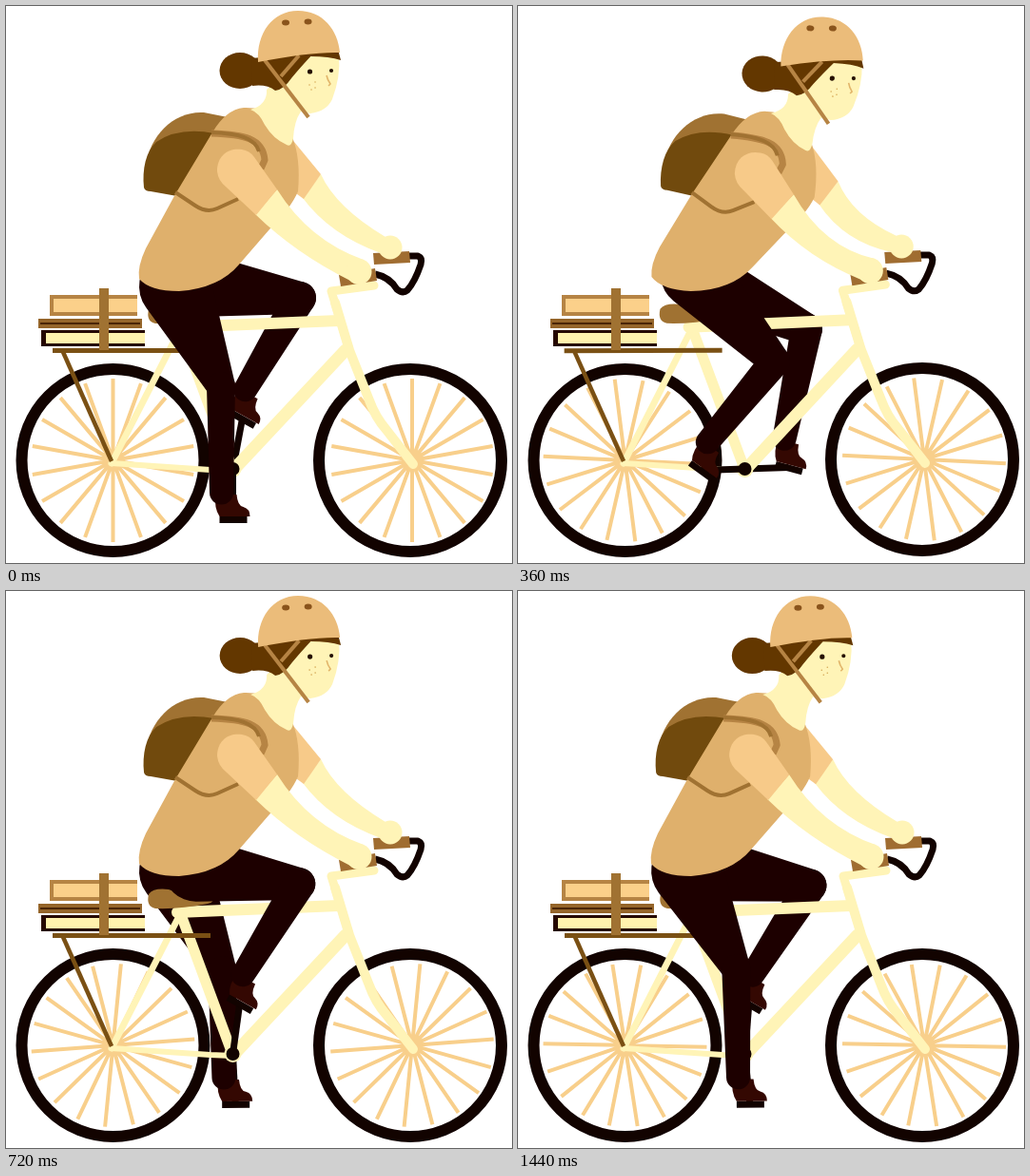
These frames come from a looping animation (532 px wide and 586 px high, 1500 ms). An HTML page with a canvas:

```html
<!DOCTYPE html>
<html lang="en">
<head>
<meta charset="utf-8">
<title>Cyclist</title>
<style>
  html, body { margin: 0; width: 100%; height: 100%; overflow: hidden; background: #fff; }
  canvas { display: block; }
</style>
</head>
<body>
<canvas id="stage" width="532" height="586"></canvas>
<script>
const ctx = document.getElementById('stage').getContext('2d');
const LOOP = 1500, STEP = 60, TAU = Math.PI * 2, RAD = Math.PI / 180;

const INK = '#120300', TROUSERS = '#1d0000', SHOE = '#340802';
const SKIN = '#fff4b7', SHIRT = '#dfb06c', SLEEVE = '#f7ca89', HELMET = '#ebbc7a';
const HAIR = '#633700', PACK = '#714a0d', BROWN = '#a07232', RACK = '#7a5014';
const SPOKE = '#f8cf8b', STRAP = '#b68444';

const CRANK = { x: 238.5, y: 487 };
const HIP = { x: 180, y: 295 };
const REAR_AXLE = { x: 112.5, y: 478 };
const FRONT_AXLE = { x: 425, y: 478 };

// One row per 60 degrees of crank: hip x, y, radius, knee x, y, radius, pedal tilt
const LEG_KEYS = [
  [178, 295, 38, 226, 400, 15, 0],
  [189, 286, 37, 255, 383, 16, 28],
  [182, 281, 34, 286, 359, 16, 40],
  [200, 293, 34, 309, 307, 17, 29],
  [190, 288, 34, 308, 329, 17, 21],
  [183, 283, 34, 290, 355, 16, 8]
];

function fillPath(d, color) {
  ctx.fillStyle = color;
  ctx.fill(new Path2D(d));
}

function strokePath(d, color, width, cap = 'butt') {
  ctx.strokeStyle = color;
  ctx.lineWidth = width;
  ctx.lineCap = cap;
  ctx.lineJoin = 'round';
  ctx.stroke(new Path2D(d));
}

function ellipse(x, y, rx, color, ry = rx) {
  ctx.fillStyle = color;
  ctx.beginPath();
  ctx.ellipse(x, y, rx, ry, 0, 0, TAU);
  ctx.fill();
}

function rect(x, y, w, h, color) {
  ctx.fillStyle = color;
  ctx.fillRect(x, y, w, h);
}

// Convex limb between two circles
function limb(a, ra, b, rb, color) {
  const dir = Math.atan2(b.y - a.y, b.x - a.x);
  const spread = Math.acos((ra - rb) / Math.hypot(b.x - a.x, b.y - a.y));
  ctx.fillStyle = color;
  ctx.beginPath();
  ctx.arc(a.x, a.y, ra, dir + spread, dir - spread);
  ctx.arc(b.x, b.y, rb, dir - spread, dir + spread);
  ctx.fill();
}

function rotate(p, angle, origin = { x: 0, y: 0 }) {
  const c = Math.cos(angle), s = Math.sin(angle);
  const x = p.x - origin.x, y = p.y - origin.y;
  return { x: origin.x + x * c - y * s, y: origin.y + x * s + y * c };
}

function withRotation(angle, origin, draw) {
  ctx.save();
  ctx.translate(origin.x, origin.y);
  ctx.rotate(angle);
  ctx.translate(-origin.x, -origin.y);
  draw();
  ctx.restore();
}

// Parabolic hop between two times, 0..1
function hop(t, start, end) {
  const u = (t - start) / (end - start);
  return u > 0 && u < 1 ? 4 * u * (1 - u) : 0;
}

// Smooth periodic interpolation through the leg poses
function legPose(phase) {
  const n = LEG_KEYS.length;
  const pos = (((phase / 60) % n) + n) % n;
  const i = Math.floor(pos), u = pos - i;
  const key = k => LEG_KEYS[(i + k + n) % n];
  return LEG_KEYS[0].map((_, j) => {
    const [a, b, c, d] = [key(-1)[j], key(0)[j], key(1)[j], key(2)[j]];
    return b + u / 2 * (c - a + u * (2 * a - 5 * b + 4 * c - d + u * (3 * (b - c) + d - a)));
  });
}

// The pedal reaches slightly forward over the top of its turn
function pedalAt(phase) {
  const s = Math.sin(phase * RAD), c = Math.cos(phase * RAD);
  return {
    x: CRANK.x - 46 * s + 10 * Math.max(0, -c) ** 4,
    y: CRANK.y + 53 * c
  };
}

function drawCrank(phase) {
  const p = pedalAt(phase);
  strokePath(`M${CRANK.x} ${CRANK.y}L${p.x} ${p.y}`, INK, 7);
}

function drawLeg(phase) {
  const [hx, hy, hr, kx, ky, kr, degrees] = legPose(phase);
  const pedal = pedalAt(phase), tilt = degrees * RAD;
  const knee = { x: kx, y: ky };
  const offset = rotate({ x: -12, y: -28 }, tilt);
  const ankle = { x: pedal.x + offset.x, y: pedal.y + offset.y };

  ctx.save();
  ctx.translate(pedal.x, pedal.y);
  ctx.rotate(tilt);
  rect(-14, -3, 29, 7, INK);
  fillPath('M-18 -26L4 -26Q5 -14 11 -13Q18 -11 18 -3L-14 -3Q-20 -12 -18 -26Z', SHOE);
  ctx.restore();

  limb({ x: hx, y: hy }, hr, knee, kr, TROUSERS);
  limb(knee, kr, ankle, 12.5, TROUSERS);
}

function drawWheel(x, y, turn, hubShift) {
  const hub = x + hubShift;
  ctx.strokeStyle = SPOKE;
  ctx.lineWidth = 4;
  ctx.lineCap = 'butt';
  ctx.beginPath();
  for (let a = 0; a < 360; a += 20) {
    const s = Math.sin((a + turn) * RAD), c = Math.cos((a + turn) * RAD);
    ctx.moveTo(hub + 6 * s, y - 6 * c);
    ctx.lineTo(hub + 86 * s, y - 86 * c);
  }
  ctx.stroke();
  ellipse(hub, y, 10.5, SPOKE);
  ctx.strokeStyle = INK;
  ctx.lineWidth = 12;
  ctx.beginPath();
  ctx.arc(x, y, 96, 0, TAU);
  ctx.stroke();
}

function drawFrame() {
  strokePath('M111 481L215 488L238 489', SKIN, 6, 'round');
  strokePath('M111 481L183 340', SKIN, 7, 'round');
  strokePath('M183 338L238 487', SKIN, 11, 'round');
  strokePath('M180 338L350 331', SKIN, 12, 'round');
  strokePath('M357 362L241 486', SKIN, 13, 'round');
  strokePath('M387 294L342 300L361 362', SKIN, 9, 'round');
  strokePath('M346 312L361 362L382 415Q388 432 400 446L428 482', SKIN, 10, 'round');
  fillPath('M150 319Q155 312 171 314Q190 322 217 323Q220 327 212 329Q183 335 157 334Q147 332 150 319Z', BROWN);
  strokePath('M60 364L111 479', RACK, 4.5);
  rect(49, 360, 166, 5, RACK);
}

function drawBooks(t) {
  const toss = hop(t, 400, 660);
  const top = -35 * toss, middle = -16 * toss, bottom = -5 * toss;
  rect(46, 304 + top, 92, 22, STRAP);
  rect(50, 308 + top, 88, 14, '#fbd08a');
  rect(34, 329 + middle, 109, 10, '#95652a');
  rect(36, 333 + middle, 105, 2, '#4a2505');
  rect(37, 341 + bottom, 109, 17, '#250800');
  rect(42, 344 + bottom, 104, 11, '#fff2ae');
  rect(98, 297 + top, 10, 65 + bottom - top, BROWN);
}

function drawHandlebar() {
  strokePath('M423 263L433 263Q438 265 436 272Q430 290 422 299Q417 303 411 298Q403 285 388 282', INK, 7);
  fillPath('M386 260L424 258L425 270L387 272Z', '#a06d31');
  fillPath('M350 283L388 276L390 289L352 295Z', '#a06d31');
}

// Arm whose upper half follows the body while the wrist follows the grip
function drawArm(points, lean, pitch) {
  const p = points.map(([x, y, gripped]) =>
    gripped ? rotate({ x, y }, pitch, REAR_AXLE) : rotate({ x, y }, lean, HIP));
  const at = i => `${p[i].x} ${p[i].y}`;
  fillPath(`M${at(0)}Q${at(1)} ${at(2)}L${at(3)}Q${at(4)} ${at(5)}Z`, SKIN);
}

function drawHand(x, y, r, pitch) {
  const hand = rotate({ x, y }, pitch, REAR_AXLE);
  ellipse(hand.x, hand.y, r, SKIN);
}

function drawTorso() {
  fillPath('M147 168C151 136 177 110 208 112L238 118L217 138Z', BROWN);
  fillPath('M145 191C143 172 147 153 158 143Q182 127 219 134L180 200L152 195Q146 195 145 191Z', PACK);
  fillPath('M250 107Q286 106 301 138Q310 160 307 195Q300 212 277 235L245 272Q224 297 182 300Q151 300 140 287Q138 274 147 255L178 198L217 133Q231 109 250 107Z', SHIRT);
  strokePath('M216 134C250 135 270 139 272 162L268 171', STRAP, 7);
  strokePath('M216 133C245 134 262 139 266 153', BROWN, 4);
  strokePath('M178 196L199 210Q211 218 222 213L244 203', BROWN, 4);
}

function drawHead() {
  fillPath('M274 88L318 48L350 52Q352 74 343 98Q337 111 320 113L310 111Q303 121 302 139Q300 149 295 146Q281 140 272 125Q266 112 257 109Q275 104 274 88Z', SKIN);
  ellipse(246, 68, 21.5, HAIR, 19);
  fillPath('M258 55L324 49Q309 65 300 76Q292 88 283 89Q274 82 259 84Z', HAIR);
  fillPath('M322 49L349 46L352 57Q340 53 320 53Z', HAIR);
  strokePath('M272 57L318 117', STRAP, 4);
  strokePath('M308 52L289 74', STRAP, 4);
  fillPath('M265 59C263 29 280 5 307 5C333 5 349 25 351 49Q320 48 265 59Z', HELMET);
  ellipse(294, 17.5, 4, '#8a541c', 3);
  ellipse(317.5, 16.5, 4, '#8a541c', 3);
  ellipse(319.5, 69, 2.6, '#251000');
  ellipse(342, 68, 2.1, '#251000');
  strokePath('M337 73Q338 78 341 82L339 84', '#e2b56a', 1.6);
  for (const [x, y] of [[319, 83], [325, 80], [321, 88], [325, 86]]) ellipse(x, y, 0.8, '#d5a957');
}

function drawNearSleeve() {
  fillPath('M222 174C222 157 234 149 248 151Q256 152 261 159L285 193L263 220L232 191Q223 184 222 174Z', SLEEVE);
}

function drawScene(t) {
  const frame = Math.floor(t / STEP);
  const phase = frame * 14.72;
  const time = frame * STEP;
  const lean = 0.049 * Math.sin((phase - 3) * RAD) ** 2;
  // A bump passes under the front wheel, then under the rear one
  const pitch = -0.0128 * hop(time, 100, 380);
  const rearLift = 3 * hop(time, 370, 630);
  const front = rotate(FRONT_AXLE, pitch, REAR_AXLE);

  rect(0, 0, 532, 586, '#fff');
  drawWheel(REAR_AXLE.x, REAR_AXLE.y - rearLift, frame * 8.8, 0);
  drawWheel(front.x, front.y, frame * 8.8, 2);

  drawCrank(phase + 180);
  drawLeg(phase + 180);
  withRotation(pitch, REAR_AXLE, drawFrame);
  drawBooks(time);
  ellipse(CRANK.x, CRANK.y, 9, SKIN);
  ellipse(CRANK.x, CRANK.y, 7, INK);
  drawCrank(phase);
  drawLeg(phase);
  withRotation(pitch, REAR_AXLE, drawHandlebar);

  drawArm([[331, 177], [347, 212], [399, 243, true], [394, 260, true], [341, 241], [312, 202]], lean, pitch);
  drawHand(404, 254, 12.5, pitch);
  withRotation(lean, HIP, () => {
    fillPath('M303 143L331 177L313 203L302 195Z', SLEEVE);
    drawTorso();
    drawHead();
  });
  drawArm([[285, 193], [319, 247], [376, 267, true], [362, 289, true], [304, 260], [262, 219]], lean, pitch);
  drawHand(371, 279.5, 13.5, pitch);
  withRotation(lean, HIP, drawNearSleeve);
}

const started = performance.now();
function tick() {
  drawScene((performance.now() - started) % LOOP);
  requestAnimationFrame(tick);
}
tick();
</script>
</body>
</html>
```
